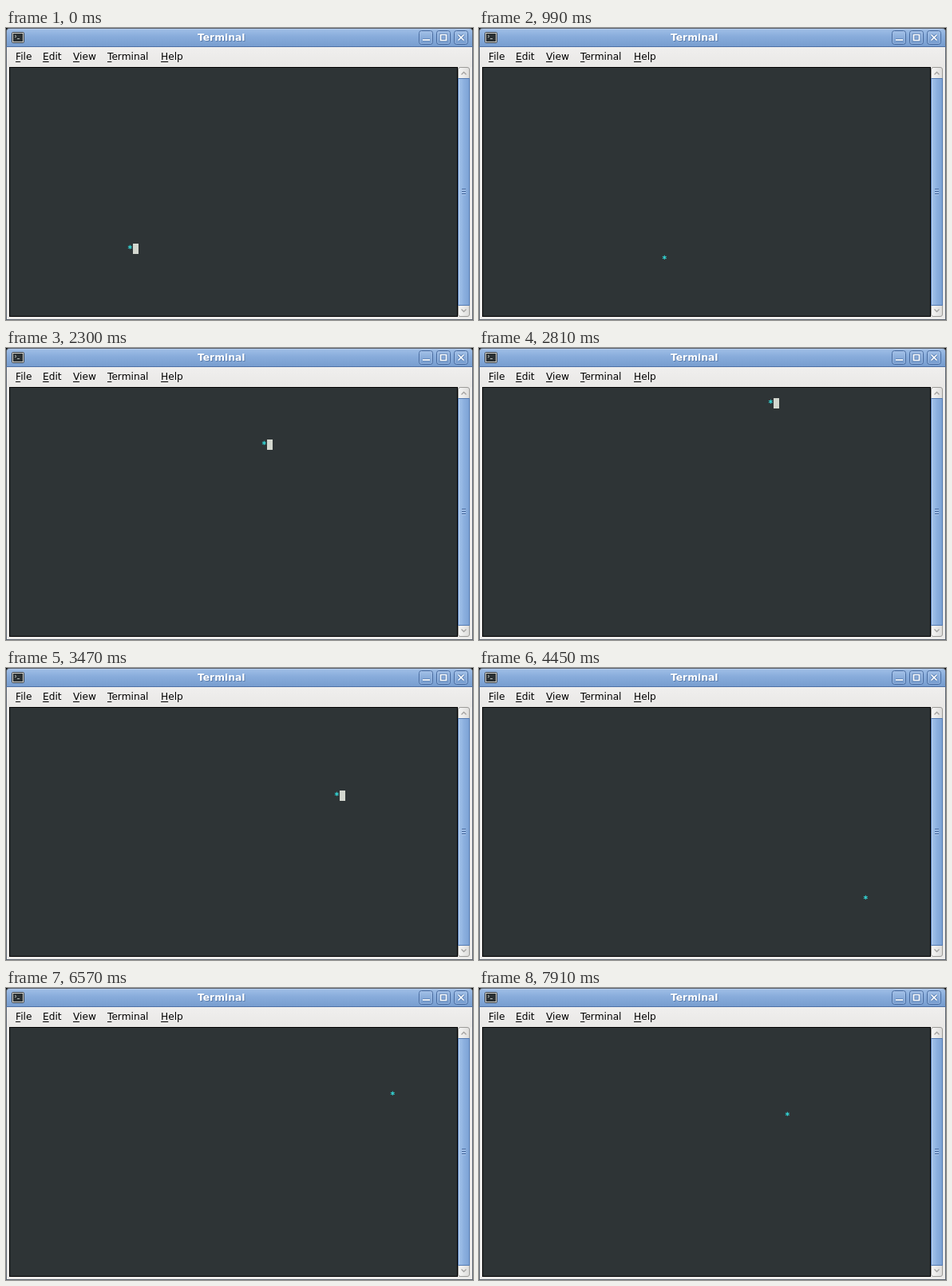
Recreate the animation shown at these times as an HTML page. Size 585 by 367 pixels, loop 8 s.

```html
<!DOCTYPE html>
<html lang="en">
<head>
<meta charset="utf-8">
<title>Terminal</title>
<style>
  html, body { margin: 0; width: 100%; height: 100%; overflow: hidden; background: #000; }
  svg { display: block; width: 585px; height: 367px; }
  .title, nav span, #ball { position: absolute; white-space: pre; }
  .title {
    left: 240px; top: 4px; color: #fff; text-shadow: 1px 1px #3f5f8f99;
    font: bold 12.3px/16px "DejaVu Sans", sans-serif;
  }
  nav span { top: 28px; font: 12.2px/16px "DejaVu Sans", sans-serif; color: #000; }
  nav span::first-letter { text-decoration: underline 1px; text-underline-offset: 2px; }
  #ball {
    left: 0; top: 0; width: 14px; height: 13px; color: #34e2e2;
    font: 11px/13px "DejaVu Sans Mono", monospace; -webkit-text-stroke: .3px #34e2e2;
  }
  #cursor { position: absolute; left: 7px; top: 0; width: 7px; height: 13px; background: #d3d7cf; }
  #screen { position: absolute; left: 5px; top: 50px; width: 561px; height: 312px; overflow: hidden; }
</style>
</head>
<body>
<svg viewBox="0 0 585 367">
  <defs>
    <linearGradient id="bar" x2="0" y2="1">
      <stop offset="0" stop-color="#a0bfe7"/>
      <stop offset=".45" stop-color="#88acdb"/>
      <stop offset="1" stop-color="#789ed0"/>
    </linearGradient>
    <linearGradient id="btn" x2="0" y2="1">
      <stop offset="0" stop-color="#a3c1e8"/>
      <stop offset="1" stop-color="#7299cc"/>
    </linearGradient>
    <linearGradient id="menu" x2="0" y2="1">
      <stop offset="0" stop-color="#f0efee"/>
      <stop offset="1" stop-color="#e9e8e6"/>
    </linearGradient>
    <linearGradient id="thumb">
      <stop offset="0" stop-color="#a7c6ec"/>
      <stop offset=".5" stop-color="#8cb0df"/>
      <stop offset="1" stop-color="#7ca2d4"/>
    </linearGradient>
    <linearGradient id="step">
      <stop offset="0" stop-color="#f8f8f7"/>
      <stop offset="1" stop-color="#dddcda"/>
    </linearGradient>
    <g id="button">
      <rect x=".5" y="3.5" width="17" height="17" rx="3" fill="url(#btn)" stroke="#46699d"/>
      <rect x="1.5" y="4.5" width="15" height="15" rx="2" fill="none" stroke="#a9c4ea" stroke-opacity=".6"/>
    </g>
    <g id="marks" fill="none">
      <path d="M522 15H531"/>
      <path d="M544.5 8.5H551.5V15.5H544.5Z"/>
      <path d="M566.5 8.5L573.5 15.5M573.5 8.5L566.5 15.5"/>
    </g>
  </defs>

  <!-- window frame -->
  <path d="M0 367V4Q0 0 4 0H581Q585 0 585 4V367Z" fill="#5a626e"/>
  <path d="M1 366V5Q1 1 5 1H580Q584 1 584 5V366Z" fill="#edeceb"/>
  <path d="M1 23V5Q1 1 5 1H580Q584 1 584 5V23Z" fill="url(#bar)"/>
  <path d="M5 1.5H580" stroke="#b4cdee"/>
  <path d="M0 23.5H585" stroke="#4e71a5"/>
  <rect x="1" y="24" width="583" height="25" fill="url(#menu)"/>

  <!-- title bar -->
  <rect x="7.5" y="5.5" width="15" height="13" rx="1" fill="#d3d3cf" stroke="#3c4248"/>
  <rect x="9" y="7" width="12" height="10" fill="#2b3134"/>
  <path d="M11 9l2 1.5l-2 1.5M14 13.5h3" fill="none" stroke="#c8cdc8" stroke-width=".9"/>
  <use href="#button" x="517"/>
  <use href="#button" x="539"/>
  <use href="#button" x="561"/>
  <use href="#marks" stroke="#5b80b4" stroke-width="3.5"/>
  <use href="#marks" stroke="#fff" stroke-width="1.7"/>

  <!-- scroll bar -->
  <rect x="566.5" y="49.5" width="14" height="313" rx="2.5" fill="url(#step)" stroke="#9b9a97"/>
  <rect x="566.5" y="63.5" width="14" height="285" fill="url(#thumb)" stroke="#5379b0"/>
  <path d="M567.5 64V348" stroke="#b8d0f0"/>
  <path d="M570.5 58.5l3-3l3 3M570.5 353.5l3 3l3-3" fill="none" stroke="#a3a2a0" stroke-width="1.3"/>
  <path d="M571 202.5h5M571 205.5h5M571 208.5h5" stroke="#42659a"/>
  <path d="M571 203.5h5M571 206.5h5M571 209.5h5" stroke="#b4cdf1"/>

  <!-- terminal area -->
  <rect x="4" y="49" width="562" height="314" fill="#000"/>
  <rect x="5" y="50" width="560" height="312" fill="#2e3436"/>
</svg>

<div class="title">Terminal</div>
<nav>
  <span style="left:12px">File</span>
  <span style="left:46px">Edit</span>
  <span style="left:84px">View</span>
  <span style="left:127px">Terminal</span>
  <span style="left:194px">Help</span>
</nav>
<div id="screen"><div id="ball">*<div id="cursor"></div></div></div>

<script>
const LOOP = 8000, STEP = 95.3, LEAD = 60, BLINK = 570;
const COLS = 80, ROWS = 24, CELL_W = 7, CELL_H = 13;
const START_COL = 21, START_ROW = 17, LAST_MOVE = 83;
const ball = document.getElementById('ball');
const cursor = document.getElementById('cursor');

// Walks 0..max and back again
const bounce = (p, max) => max - Math.abs(max - p % (2 * max));

function draw(now) {
  const t = now % LOOP;
  const move = Math.min(LAST_MOVE, Math.floor((t + LEAD) / STEP));
  const x = CELL_W * bounce(START_COL + move, COLS - 1);
  const y = CELL_H * bounce(START_ROW + move, ROWS - 1);
  ball.style.transform = `translate(${x}px, ${y}px)`;
  cursor.hidden = t % (2 * BLINK) >= BLINK;
}

let start;
function tick(now) {
  start ??= now;
  draw(Math.max(0, now - start));
  requestAnimationFrame(tick);
}
draw(0);
requestAnimationFrame(tick);
</script>
</body>
</html>
```
